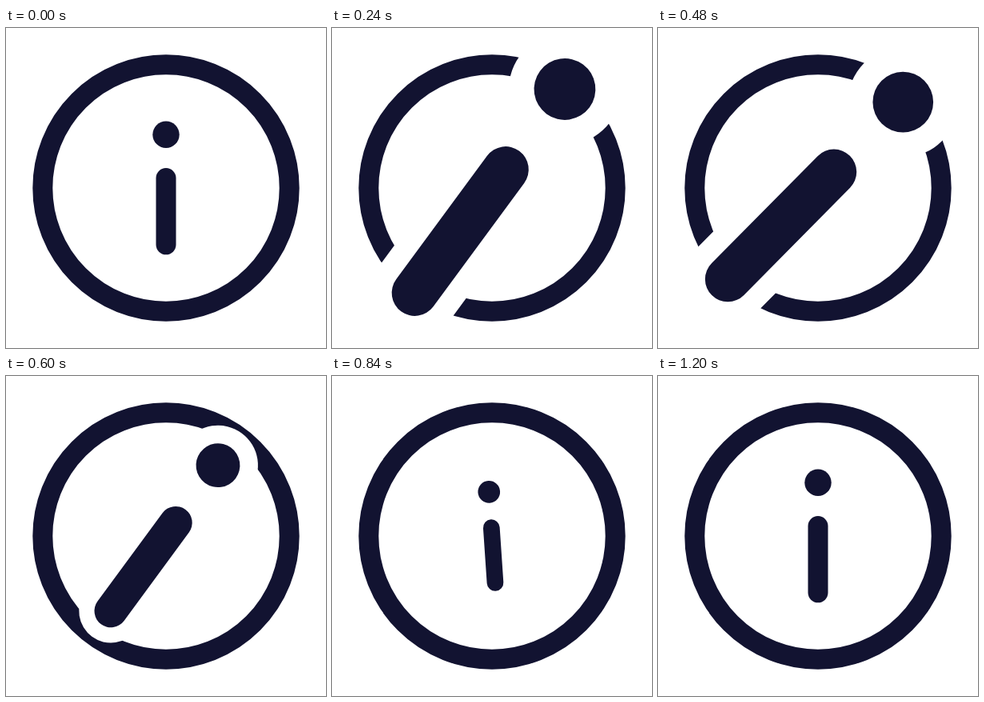
Animation, 400 px wide and 400 px high, one loop 3.23 s. Source, as an HTML page:

```html
<!DOCTYPE html>
<html lang="en">
<head>
<meta charset="utf-8">
<title>Info icon</title>
<style>
  html, body { margin: 0; height: 100%; overflow: hidden; background: #fff; }
  svg { display: block; width: 100%; height: 100%; }
  .ink { fill: #121331; }
  .line { fill: none; stroke: #121331; stroke-width: 25; stroke-linecap: round; }
  .halo { fill: #fff; stroke: #fff; stroke-linecap: round; }
</style>
</head>
<body>
<svg viewBox="0 0 400 400">
  <circle class="line" cx="200" cy="200" r="154.2"/>
  <g id="letter">
    <circle class="halo" cy="-66.7" r="30.4" stroke="none" style="stroke: none"/>
    <path class="halo" d="M0-12.5V70.8" stroke-width="48.4"/>
    <circle class="ink" cy="-66.7" r="16.7"/>
    <path class="line" d="M0-12.5V70.8"/>
  </g>
</svg>
<script>
const LOOP = 3230, STEP = 30, END = 1200;
// [time in ms, value], joined by sine easing
const turn = [[0, 0], [336, 44.8], [480, 44.7], [958, -12], [END, 0]];
const size = [[0, 1], [240, 2.3], [480, 2.265], [745, 0.808], [END, 1]];
const letter = document.getElementById('letter');

function valueAt(keys, t) {
  const i = keys.findIndex(([time]) => time >= t);
  if (i === 0) return keys[0][1];
  const [t0, a] = keys[i - 1], [t1, b] = keys[i];
  return a + (b - a) * (1 - Math.cos(Math.PI * (t - t0) / (t1 - t0))) / 2;
}

function draw(now) {
  const t = Math.min(END, Math.floor(now % LOOP / STEP) * STEP);
  letter.setAttribute('transform',
    `translate(200 200) rotate(${valueAt(turn, t)}) scale(${valueAt(size, t)})`);
}

let start;
function tick(now) {
  start ??= now;
  draw(now - start);
  requestAnimationFrame(tick);
}
draw(0);
requestAnimationFrame(tick);
</script>
</body>
</html>
```
